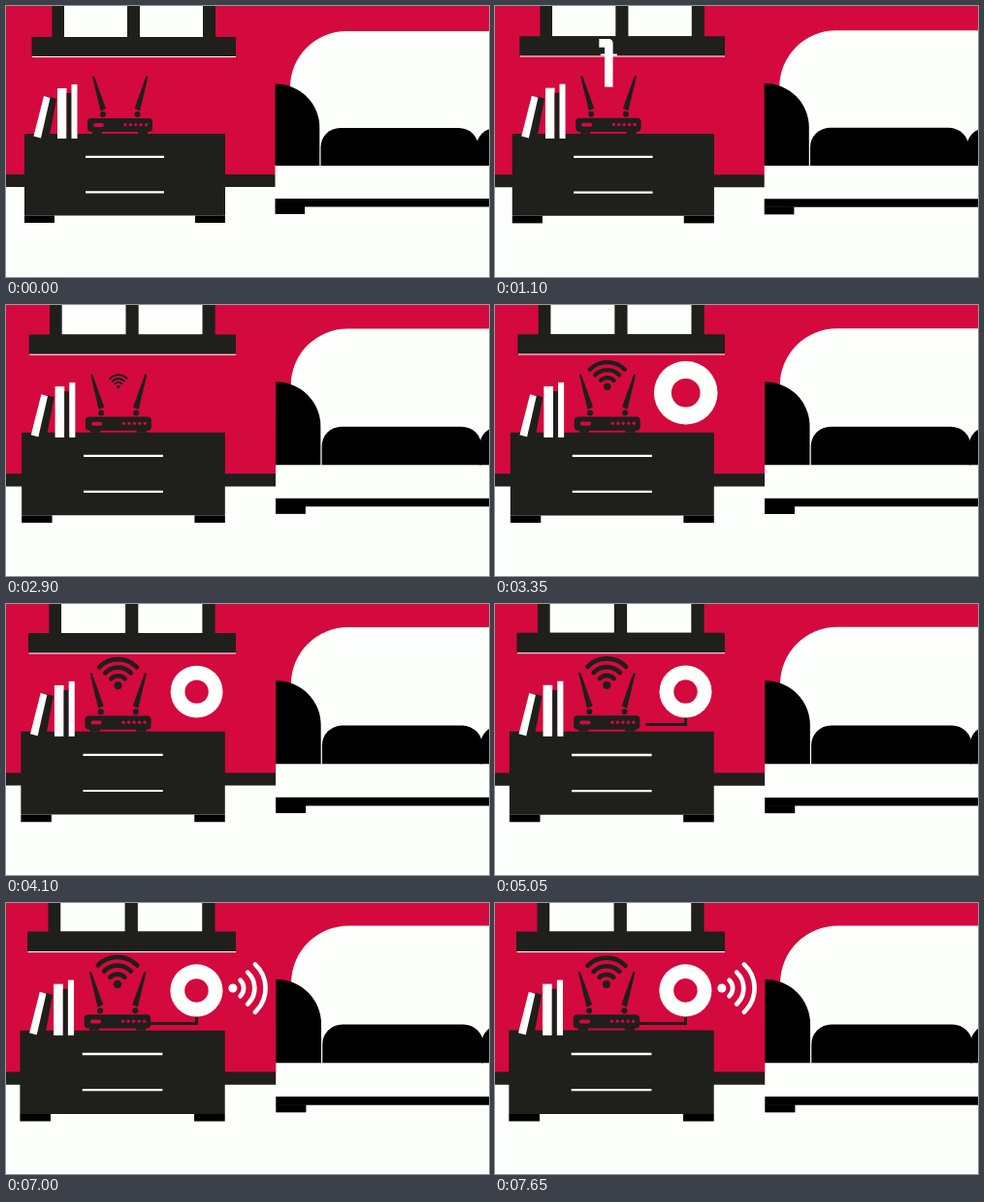
Recreate the animation shown at these times as an HTML page with a canvas. Size 498 px wide and 280 px high, loop 7700 ms.

```html
<!DOCTYPE html>
<html lang="en">
<head>
<meta charset="utf-8">
<title>Wi-Fi extender</title>
<style>
html, body { margin: 0; width: 100%; height: 100%; overflow: hidden; background: #fdfffd; }
canvas { display: block; width: 100%; height: 100%; }
</style>
</head>
<body>
<canvas id="stage" width="498" height="280"></canvas>
<script>
const ctx = document.getElementById('stage').getContext('2d');
const LOOP = 7700;
const RED = '#d4093d', DARK = '#1f1f1c', BLACK = '#000', WHITE = '#fdfffd';

const ramp = (t, start, length) => Math.min(1, Math.max(0, (t - start) / length));
const easeOut = p => 1 - (1 - p) ** 3;
const smooth = p => p * p * (3 - 2 * p);

function box(color, x1, y1, x2, y2, radii = 0) {
  ctx.fillStyle = color;
  ctx.beginPath();
  ctx.roundRect(x1, y1, x2 - x1, y2 - y1, radii);
  ctx.fill();
}

function dot(color, x, y, r) {
  ctx.fillStyle = color;
  ctx.beginPath();
  ctx.arc(x, y, Math.max(0, r), 0, 2 * Math.PI);
  ctx.fill();
}

function shape(color, path) {
  ctx.fillStyle = color;
  ctx.fill(new Path2D(path));
}

function stroke(color, width, path) {
  ctx.strokeStyle = color;
  ctx.lineWidth = width;
  ctx.stroke(new Path2D(path));
}

function arc(color, width, x, y, r, middle, half) {
  ctx.strokeStyle = color;
  ctx.lineWidth = width;
  ctx.lineCap = 'round';
  ctx.beginPath();
  ctx.arc(x, y, r, middle - half, middle + half);
  ctx.stroke();
  ctx.lineCap = 'butt';
}

function placed(x, y, scale, angle, draw) {
  ctx.save();
  ctx.translate(x, y);
  ctx.rotate(angle);
  ctx.scale(scale, scale);
  draw();
  ctx.restore();
}

function drawRoom() {
  box(RED, -10, -10, 510, 175);
  box(DARK, -10, 174, 278, 187);

  // window and sill
  box(DARK, 47.5, -10, 216, 34);
  box(WHITE, 60, -10, 125, 32);
  box(WHITE, 138, -10, 203, 32);
  box(DARK, 26.5, 32, 237, 52);
  box(WHITE, 27, 52, 237, 53);

  // cabinet
  box(DARK, 19, 132, 226, 216.5);
  box(BLACK, 19, 216.5, 50, 224);
  box(BLACK, 195, 216.5, 226, 224);
  box(WHITE, 82, 154.7, 163, 157);
  box(WHITE, 82, 191.2, 163, 193.4);

  // books
  shape(DARK, 'M45 94L52 96L45 133L35 136Z');
  shape(WHITE, 'M39 93L45.5 95L36 136.5L28.5 134.5Z');
  box(WHITE, 53, 85, 62.5, 137);
  box(DARK, 62.5, 90, 67.5, 137);
  box(WHITE, 67.5, 81, 73.5, 137);

  // sofa
  box(WHITE, 293, 26, 600, 170, [58, 0, 0, 0]);
  box(WHITE, 277.5, 164, 510, 200);
  box(BLACK, 277.5, 80.5, 323.3, 165, [0, 45, 0, 0]);
  box(BLACK, 324.5, 126, 487, 165, [20, 20, 0, 0]);
  box(BLACK, 485, 126, 600, 165, [20, 20, 0, 0]);
  box(BLACK, 277.5, 199, 510, 207.5);
  box(BLACK, 277.5, 207, 308, 215);
}

function drawRouter() {
  shape(DARK, 'M89 73L91 72.5L103 106L97.5 108.5Z');
  shape(DARK, 'M146.5 73L144.5 72.5L132.5 106L138 108.5Z');
  dot(DARK, 100, 112, 3);
  dot(DARK, 135.5, 112, 3);
  box(DARK, 84, 116, 151, 130, 4);
  box(DARK, 89, 129, 99, 132);
  box(DARK, 136, 129, 146, 132);
  box(RED, 90, 121, 101, 125, 2);
  for (let i = 0; i < 5; i++) dot(RED, 123 + i * 5.4, 122.7, 1.7);
}

// block digits drawn around their centre
const DIGITS = [
  'M-10 -20H0V25',
  'M-11 -22H9V0H-8V22H12',
  'M-11 -22H9V22H-11M-5 0H9'
];

function drawCount(t) {
  const first = 800, step = 675;
  const i = Math.floor((t - first) / step);
  if (!(i in DIGITS)) return;
  const age = t - first - i * step;
  const grow = easeOut(ramp(age, 0, 140)) * (1 - smooth(ramp(age, step - 100, 100)));
  const settle = 1 - smooth(ramp(age, 100, 220));
  placed(i ? 121.5 : 118, 59, grow, settle * 0.14, () => {
    ctx.lineJoin = 'round';
    stroke(WHITE, 8.5, DIGITS[i]);
    const reach = age < 330 ? 8 + 20 * settle : 0;
    if (reach) stroke(WHITE, 1.8, `M${-reach} -8H${reach}`);
  });
}

function drawWifi(t) {
  const grow = easeOut(ramp(t, 2850, 300));
  if (!grow) return;
  const pulse = 0.98 - 0.06 * Math.cos((t - 3370) / 1000 * 2 * Math.PI);
  placed(117.5, 85.3, grow * pulse, 0, () => {
    dot(DARK, 0, 0, 4);
    for (const r of [10, 18.5, 27]) arc(DARK, 4.6, 0, 0, r, -Math.PI / 2, 0.8);
  });
}

function drawExtender(t) {
  const cable = 57 * ramp(t, 4400, 760);
  if (cable) {
    const drop = Math.min(cable, 8.5);
    stroke(DARK, 3, `M197.3 116.5V${116.5 + drop}H${197.3 - (cable - drop)}`);
  }
  const size = 1.22 * easeOut(ramp(t, 3050, 280)) - 0.22 * smooth(ramp(t, 3370, 280));
  placed(197.3, 91.6, size, 0, () => {
    dot(WHITE, 0, 0, 26.5);
    dot(RED, 0, 0, 12);
  });
}

function drawSignal(t) {
  dot(WHITE, 234, 89.3, 4.4 * easeOut(ramp(t, 5600, 250)));
  [11, 22, 33].forEach((r, i) => {
    const p = ramp(t, 5800 + i * 260, 300);
    if (p) arc(WHITE, 4.6 * Math.min(1, 0.25 + p), 234, 89.3, r - 3 * (1 - p), 0, 0.1 + 0.72 * p);
  });
}

function frame(now) {
  const t = now % LOOP;
  const zoom = 1 + 0.021 * (1 - (1 - t / LOOP) ** 2);
  ctx.fillStyle = WHITE;
  ctx.fillRect(0, 0, 498, 280);
  placed(240, 150, zoom, 0, () => {
    ctx.translate(-240, -150);
    drawRoom();
    drawRouter();
    drawCount(t);
    drawWifi(t);
    drawExtender(t);
    drawSignal(t);
  });
}

const start = performance.now();
function tick() {
  frame(performance.now() - start);
  requestAnimationFrame(tick);
}
tick();
</script>
</body>
</html>
```
